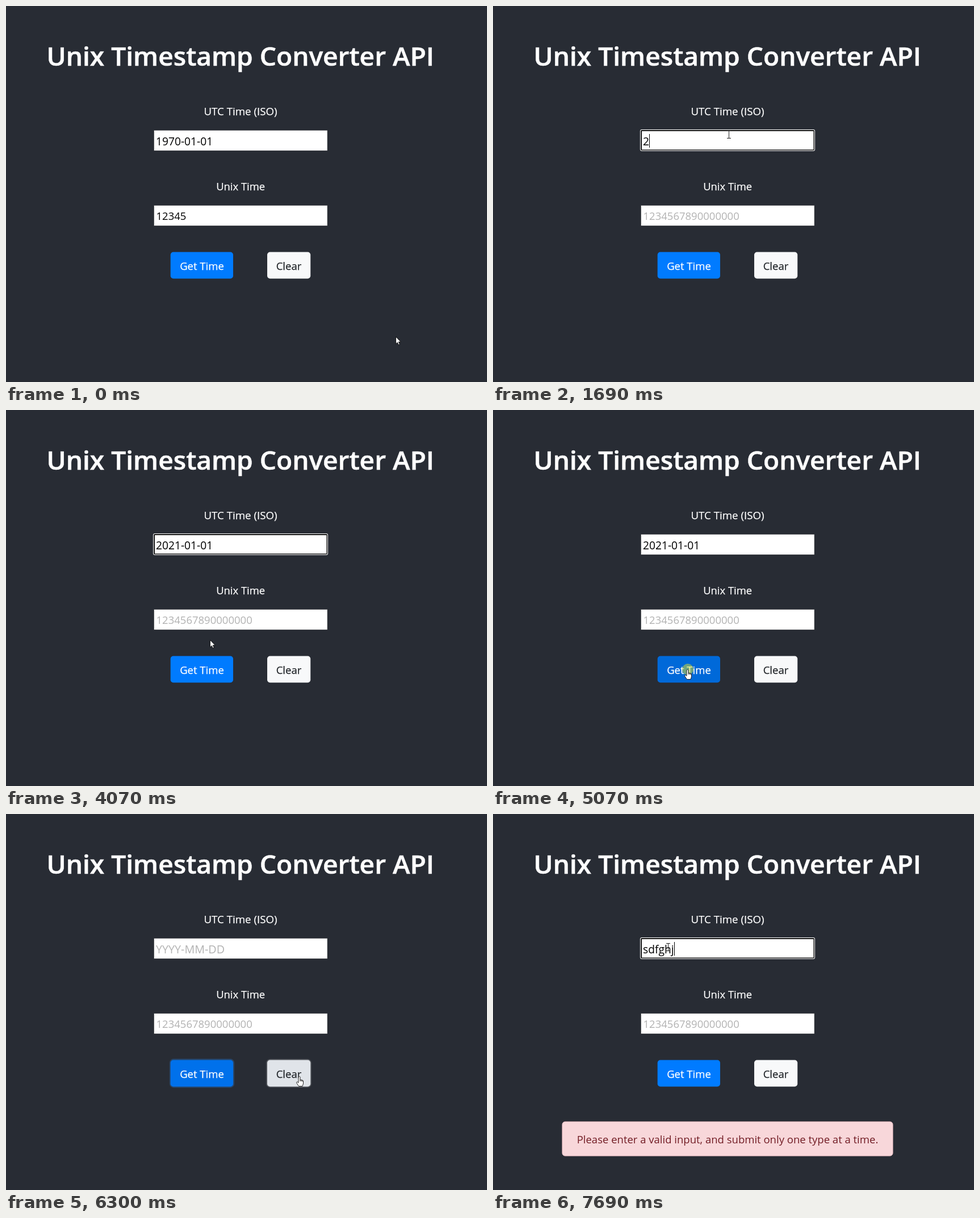
Recreate the animation shown at these times as an HTML page. Size 847 by 661 pixels, loop 8000 ms.

```html
<!DOCTYPE html>
<html lang="en">
<head>
<meta charset="utf-8">
<title>Unix Timestamp Converter API</title>
<style>
  html, body { margin: 0; width: 100%; height: 100%; overflow: hidden; background: #282c34; }
  svg { display: block; width: 847px; height: 661px; font: 18.5px "Open Sans", "Noto Sans", sans-serif; }
  .mid { text-anchor: middle; fill: #fff; stroke: #fff; stroke-width: .25; }
  .dark { fill: #212529; stroke: #212529; }
  .error { fill: #721c24; stroke: none; }
</style>
</head>
<body>
<svg viewBox="0 0 847 661">
  <defs>
    <g id="box">
      <rect x="260.4" y="218.4" width="305.6" height="36" fill="#767676"/>
      <rect x="261" y="219" width="304.6" height="35" fill="#fff"/>
    </g>
  </defs>
  <text class="mid" x="412.7" y="105" font-size="46.1" font-weight="600" style="stroke-width:.6">Unix Timestamp Converter API</text>
  <text class="mid" x="413" y="192" font-size="18.7">UTC Time (ISO)</text>
  <text class="mid" x="413.2" y="324" font-size="18.4">Unix Time</text>

  <use href="#box"/>
  <g id="focus">
    <rect x="259" y="217" width="308" height="38" rx="3" fill="#fff"/>
    <rect x="260" y="218" width="306" height="36" rx="2" fill="#101010"/>
    <rect x="262" y="220" width="302.5" height="32.5" fill="#fff"/>
  </g>
  <text id="utc" x="264" y="244.5"></text>
  <rect id="caret" y="225" width="1" height="24"/>

  <use href="#box" y="132"/>
  <text id="unix" x="264.5" y="376"></text>

  <rect id="getRing" fill="#268fff"/>
  <rect id="get" x="289.7" y="432.5" width="110.3" height="46.7" rx="5"/>
  <text class="mid" x="345" y="463.5">Get Time</text>
  <rect id="clearRing" fill="#d3d4d5"/>
  <rect id="clear" x="460" y="432.5" width="76.2" height="46.7" rx="5"/>
  <text class="mid dark" x="498" y="463.5">Clear</text>

  <g id="alert">
    <rect x="122" y="541" width="582" height="60" rx="5" fill="#f8d7da" stroke="#f5c6cb"/>
    <text class="mid error" x="413" y="578.5">Please enter a valid input, and submit only one type at a time.</text>
  </g>

  <circle id="halo" r="10" fill="#e1e128" opacity=".5"/>
  <g id="pointer" stroke-linejoin="round">
    <path id="arrow" d="M.5.5V13L3.3 10.4 5.2 14.6 7.2 13.7 5.4 9.6H9.2z" fill="#fff" stroke="#000" stroke-width=".8"/>
    <path id="beam" d="M-3-6.5H4M.5-6.5V6.5M-3 6.5H4" fill="none" stroke="#222"/>
    <path id="hand" d="M-2 1.2Q-.5-.6 1 1.2V6L5 7Q6.5 7.4 6.5 9V13L5 17.5H-1.5L-5.5 11.5Q-5.4 9.6-3.6 10L-2 11.5zM1 6V9M3 6.6V9.2M5 7V9.6" fill="#fff" stroke="#111" stroke-width=".9"/>
  </g>
</svg>
<script>
const LOOP = 8000, TICK = 76.7, BLINK = 545, FADE = 150;
const CLEAR1 = 520, FOCUS1 = 1286, SUBMIT = 5070, CLEAR2 = 6231, FOCUS2 = 6770;
const HOLD = 70; // time a mouse button stays down

// Pointer glides: start, end, x, y.
const glides = [
  [0, 450, 497, 458], [600, 830, 430, 198], [830, 1350, 415, 226], [3850, 4400, 343, 456],
  [5390, 5690, 546, 461], [5930, 6080, 517, 461], [6310, 6700, 308, 234]
];
// Typing runs: start, time per key, text.
const runs = [
  [1690, 105, "202"], [2130, 1, "1"], [2680, 75, "-01"], [3060, 80, "-01"],
  [7300, 1, "s"], [7530, 40, "dfghj"]
];

const $ = id => document.getElementById(id);
const clamp = v => Math.max(0, Math.min(1, v));
const within = (t, a, b) => t >= a && t < b;
const fade = (t, a, b) => clamp((t - a) / FADE) - clamp((t - b) / FADE);
const mix = (a, b, k) => `rgb(${a.map((v, i) => Math.round(v + (b[i] - v) * k))})`;
const show = (id, on) => set(id, { visibility: on ? "visible" : "hidden" });

function set(id, attrs) {
  for (const k in attrs) $(id).setAttribute(k, attrs[k]);
}

function utcValue(t) {
  if (t < CLEAR1 + HOLD) return "1970-01-01";
  const from = t < CLEAR2 + HOLD - 2 ? CLEAR1 : CLEAR2;
  return runs.filter(r => r[0] > from && r[0] <= t)
    .map(([a, step, text]) => text.slice(0, Math.floor((t - a) / step) + 1)).join("");
}

function unixValue(t) {
  if (t < CLEAR1 + HOLD) return "12345";
  return within(t, SUBMIT + 160, CLEAR2 + HOLD - 2) ? String(Date.UTC(2021, 0, 1)) : "";
}

// The caret restarts its blinking at every key.
function caretOn(t) {
  const ends = runs.map(([a, step, text]) => a + step * (text.length - 1));
  const last = Math.max(...[FOCUS1, FOCUS2, ...ends].filter(e => e <= t));
  return Math.floor((t - last) / BLINK) % 2 === 0;
}

function pointerAt(t) {
  let x = 686, y = 581;
  for (const [a, b, toX, toY] of glides) {
    const k = 1 - (1 - clamp((t - a) / (b - a))) ** 3;
    x += (toX - x) * k;
    y += (toY - y) * k;
  }
  return [Math.round(x), Math.round(y)];
}

function field(id, value, hint, hintSize) {
  $(id).textContent = value || hint;
  set(id, {
    fill: value ? "#000" : "#b2b2b2",
    "font-size": value ? (id === "utc" ? 19.2 : 18.5) : hintSize
  });
}

function ring(id, x, w, k) {
  const d = 4 * k;
  set(id, { x: x - d, y: 432.5 - d, width: w + 2 * d, height: 46.5 + 2 * d, rx: 5 + d, opacity: k / 2 });
}

function draw(t) {
  const value = utcValue(t);
  field("utc", value, "YYYY-MM-DD", 19.7);
  field("unix", unixValue(t), "1234567890000000", 18.5);

  const focused = within(t, FOCUS1, SUBMIT) || t >= FOCUS2;
  show("focus", focused);
  show("caret", focused && caretOn(t));
  set("caret", { x: value ? Math.round(264.5 + $("utc").getComputedTextLength()) : 265 });

  const getDark = fade(t, 4200, CLEAR2);
  const clearDark = fade(t, 300, FOCUS1) + fade(t, 5500, 5640) + fade(t, 5950, FOCUS2);
  set("get", { fill: mix([0, 123, 255], [0, 105, 217], getDark) });
  set("clear", { fill: mix([248, 249, 250], [224, 228, 233], clearDark) });
  ring("getRing", 290, 110, fade(t, SUBMIT, CLEAR2));
  ring("clearRing", 460, 76, fade(t, CLEAR1, FOCUS1) + fade(t, CLEAR2, FOCUS2));
  set("alert", { opacity: clamp((t - 7230) / FADE) });

  const [x, y] = pointerAt(Math.floor((t + 25) / TICK) * TICK);
  const inside = (x0, x1, y0, y1) => x >= x0 && x <= x1 && y >= y0 && y <= y1;
  const beam = inside(260, 566, 218, 254) || inside(260, 566, 350, 386);
  const hand = inside(290, 400, 433, 479) || inside(460, 536, 433, 479);
  set("pointer", { transform: `translate(${x} ${y})` });
  show("beam", beam);
  show("hand", hand);
  show("arrow", !beam && !hand);
  set("halo", { cx: x, cy: y });
  show("halo", [CLEAR1, FOCUS1, SUBMIT, CLEAR2, FOCUS2].some(p => within(t, p, p + HOLD - 2)));
}

const start = performance.now();
function tick() {
  draw((performance.now() - start) % LOOP);
  requestAnimationFrame(tick);
}
tick();
</script>
</body>
</html>
```
